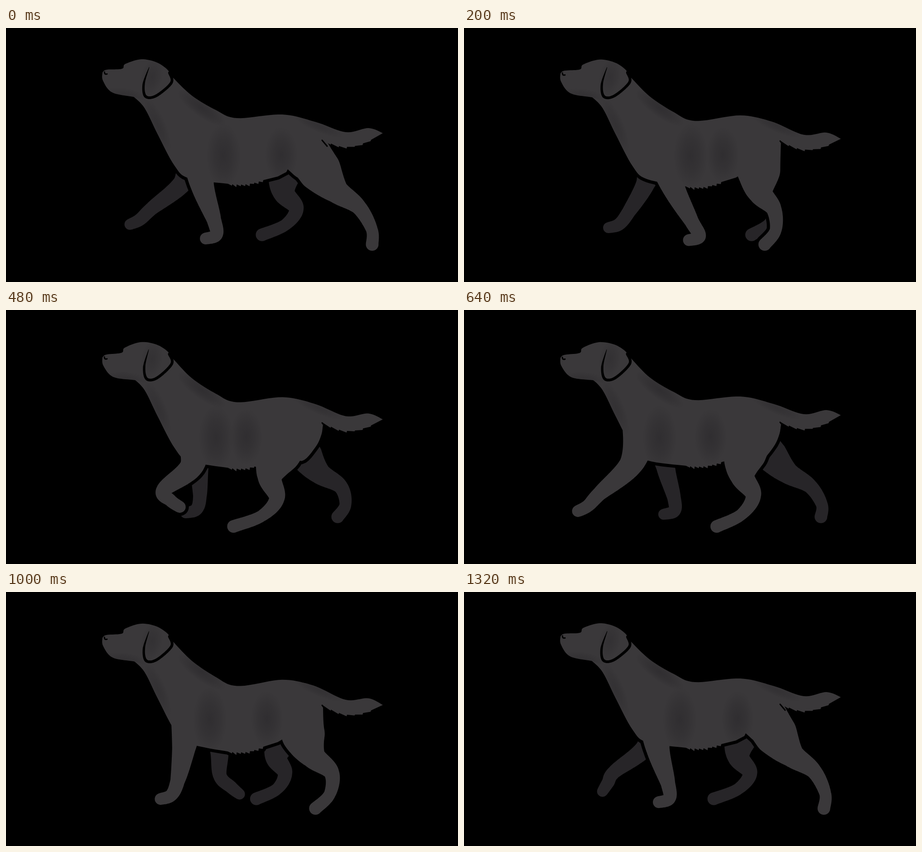
An HTML page with a canvas that plays this animation: 998 by 561 pixels, repeating every 1.36 s.

```html
<!DOCTYPE html>
<html lang="en">
<head>
<meta charset="utf-8">
<title>Trotting dog</title>
<style>
html, body { margin: 0; width: 100%; height: 100%; overflow: hidden; background: #000; }
canvas { display: block; width: 998px; height: 561px; }
</style>
</head>
<body>
<canvas id="stage" width="998" height="561"></canvas>
<script>
const ctx = document.getElementById('stage').getContext('2d');
const LOOP = 1360, STEP = 40, GAP = 7;
const COAT = '#3a383a', FAR = '#272528', BLACK = '#000';
const { PI, sin, cos, sqrt, exp } = Math;

const mix = (a, b, f) => a + (b - a) * f;
const wave = (time, period) => (1 - cos(time / period * PI * 2)) / 2;
const wrap = time => ((time % LOOP) + LOOP) % LOOP;

// Where a leg is in its stride: k runs 0 (reaching forward) to 1 (pushing off) and back.
function stride(time, touchdown, liftoff) {
  const t = wrap(time - touchdown), stance = wrap(liftoff - touchdown);
  const grounded = t < stance;
  const swing = grounded ? 0 : (t - stance) / (LOOP - stance);
  const k = grounded ? t / stance : 1 - swing;
  const arc = sin(PI * k);
  return { k, swing, plant: grounded ? arc : 0, lift: grounded ? 0 : arc };
}

function frontLeg(time) {
  const { k, swing, plant, lift } = stride(time, 650, 200);
  const elbow = [mix(366, 460, k) + 10 * (lift - plant), mix(341, 347, k)];
  const shoulder = [mix(412, elbow[0], 0.5), 268];
  const ankle = [mix(268, 520, k), mix(430, 460, sqrt(k)) - 30 * lift];
  const wrist = [mix(elbow[0], ankle[0], 0.7) + 6 * plant - 32 * lift, mix(elbow[1], ankle[1], 0.7)];
  const curl = (-70 + 155 * sin(PI * swing ** 0.75)) * PI / 180;
  const toe = [ankle[0] + 25 * sin(curl), ankle[1] + 25 * cos(curl)];
  return [shoulder, elbow, wrist, ankle, toe];
}

function hindLeg(time) {
  const { k, plant, lift } = stride(time, 430, 10);
  const sway = plant - lift * 0.5;
  const hip = [650, 250];
  const thigh = [mix(600, 692, k), 313];
  const knee = [mix(572, 730, k) + 10 * sway, mix(366, 359, k)];
  const hock = [mix(585, 780, k) + 16 * sway, mix(418, 395, k) - 6 * (plant + lift)];
  const toe = [mix(485, 812, k), 478];
  const ankle = [mix(hock[0], toe[0], 0.5) + 14, mix(hock[1], toe[1], 0.5) + 8];
  return [hip, thigh, knee, hock, ankle, toe];
}

// The far legs sit a little aside and look shorter.
const farther = (joints, dx, pivot, squash) =>
  joints.map(([x, y]) => [x + dx, pivot + (y - pivot) * squash]);

// Catmull-Rom curve as [x, y, position in points].
function smooth(points, steps) {
  const out = [], last = points.length - 1;
  const at = i => points[Math.max(0, Math.min(last, i))];
  for (let n = 0; n <= last * steps; n++) {
    const i = Math.min(last - 1, Math.floor(n / steps)), f = n / steps - i;
    const axis = c => {
      const [a, b, d, e] = [at(i - 1)[c], at(i)[c], at(i + 1)[c], at(i + 2)[c]];
      return b + f * (d - a + f * (2 * a - 5 * b + 4 * d - e + f * (3 * (b - d) + e - a))) / 2;
    };
    out.push([axis(0), axis(1), i + f]);
  }
  return out;
}

function limb(joints, radii, color, grow = 0) {
  ctx.beginPath();
  for (const [x, y, k] of smooth(joints, 22)) {
    const i = Math.min(Math.floor(k), radii.length - 2);
    const r = mix(radii[i], radii[i + 1], k - i) + grow;
    ctx.moveTo(x + r, y);
    ctx.arc(x, y, r, 0, PI * 2);
  }
  ctx.fillStyle = color;
  ctx.fill();
}

// A ragged edge of fur from right to left, hanging lowest in the middle.
function fringe(x1, y1, x2, y2, hang, count, depth) {
  const out = [];
  for (let i = 0; i < count; i++) {
    const f = i / count, x = mix(x1, x2, f), y = mix(y1, y2, f) + hang * sin(PI * f);
    out.push([x, y], [x - 1, y + depth * (0.75 + 0.25 * sin(i * 2.4))]);
  }
  return [...out, [x2, y2]];
}

function outline(points) {
  const path = new Path2D();
  points.forEach(([x, y]) => path.lineTo(x, y));
  path.closePath();
  return path;
}

const back = [[366, 107], [410, 149], [463, 181], [510, 199], [610, 191], [685, 208], [750, 230],
  [800, 221], [832, 232]];
const rump = [[699, 248], [697, 272], [683, 303], [653, 333], [622, 312]];
const chest = [[490, 344], [404, 332], [372, 304], [335, 235], [306, 177], [281, 151]];
const bodyPoints = [[330, 125], ...smooth(back, 10), ...fringe(806, 247, 700, 248, 15, 6, 4),
  ...smooth(rump, 6), [619, 318], [600, 328], ...fringe(568, 336, 490, 344, 5, 8, 6),
  ...smooth(chest, 8)];

const headPath = outline(smooth([[213, 98], [222, 92], [256, 90], [264, 79], [303, 69], [344, 82],
  [363, 111], [325, 160], [281, 152], [234, 142], [214, 116], [213, 98]], 10));
const ear = [[316, 87], [304, 124], [308, 151], [331, 150], [365, 121], [361, 99]];
const earLine = [0.6, 2.6, 3, 3, 3, 3];

// Back and belly sink mid-body, the tail swings about the hip, the nape follows the head.
function flex(points, bob, nod) {
  return points.map(([x, y]) => [x, y
    + bob * (8.5 * exp(-(((x - 510) / 95) ** 2)) + 0.115 * Math.max(0, x - 680))
    - nod * 3 * exp(-((x - 366) ** 2 + (y - 106) ** 2) / 1500)]);
}

function shade(x, y, rx, ry, alpha, turn = 0) {
  ctx.save();
  ctx.translate(x, y);
  ctx.rotate(turn);
  ctx.scale(rx, ry);
  const g = ctx.createRadialGradient(0, 0, 0, 0, 0, 1);
  g.addColorStop(0, `rgba(38,36,39,${alpha})`);
  g.addColorStop(0.5, `rgba(38,36,39,${alpha * 0.6})`);
  g.addColorStop(1, 'rgba(38,36,39,0)');
  ctx.fillStyle = g;
  ctx.fillRect(-1, -1, 2, 2);
  ctx.restore();
}

function blackLine(path, width) {
  ctx.strokeStyle = BLACK;
  ctx.lineWidth = width;
  ctx.lineCap = ctx.lineJoin = 'round';
  ctx.stroke(path);
}

function drawHead(nod) {
  ctx.save();
  ctx.translate(330, 105);
  ctx.rotate(-0.066 * nod);
  ctx.translate(-330, -105);
  ctx.fillStyle = COAT;
  ctx.fill(headPath);
  ctx.save();
  ctx.clip(headPath);
  shade(322, 108, 24, 42, 0.35, 0.2);
  shade(262, 150, 50, 18, 0.35, 0.15);
  ctx.restore();
  limb(ear, earLine, BLACK);
  blackLine(new Path2D('M217.5 97Q217 103 223 101.5'), 3);
  ctx.restore();
}

function draw(time) {
  ctx.fillStyle = BLACK;
  ctx.fillRect(0, 0, 998, 561);
  const bob = wave(time + 20, LOOP / 2), nod = wave(time + 60, LOOP);

  limb(farther(hindLeg(time + 690), -10, 360, 0.82), [36, 36, 24, 16, 13, 14], FAR);
  limb(farther(frontLeg(time + 640), 22, 340, 0.9), [38, 21, 15, 14, 12], FAR);

  const near = [[frontLeg(time), [40, 26, 16, 14, 13]], [hindLeg(time), [50, 48, 27, 17, 13, 14]]];
  const body = outline(flex(bodyPoints, bob, nod));
  blackLine(body, GAP * 2);
  near.forEach(([joints, radii]) => limb(joints, radii, BLACK, GAP));
  ctx.fillStyle = COAT;
  ctx.fill(body);
  near.forEach(([joints, radii]) => limb(joints, radii, COAT));

  const [[, elbow], [, thigh]] = near.map(([joints]) => joints);
  ctx.save();
  ctx.clip(body);
  shade(430 + (elbow[0] - 366) * 0.75, 282, 38, 72, 0.5);
  shade(607 + (thigh[0] - 690) * 0.9, 280, 36, 62, 0.5);
  shade(432, 176, 65, 20, 0.5, 0.62);
  shade(335, 215, 18, 65, 0.35, -0.4);
  shade(690, 216, 60, 14, 0.35, 0.4);
  ctx.restore();

  blackLine(outline(flex([[698, 248], [709, 261]], bob, nod)), 3);
  drawHead(nod);
}

const start = performance.now();
function tick() {
  const elapsed = (performance.now() - start) % LOOP;
  draw(Math.floor(elapsed / STEP) * STEP);
  requestAnimationFrame(tick);
}
tick();
</script>
</body>
</html>
```
